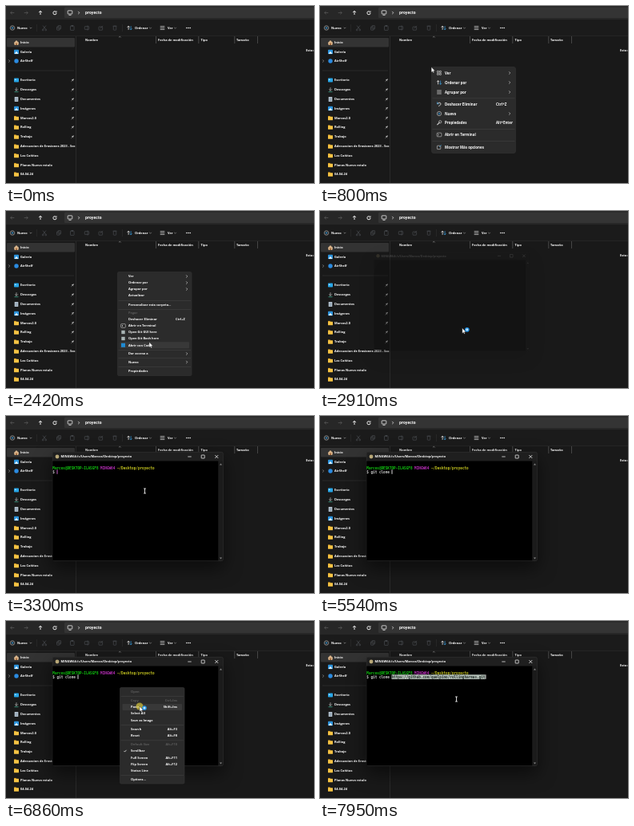
An HTML page with a canvas for the animation above (8000 ms loop, 385 by 222 pixels).

```html
<!DOCTYPE html>
<html lang="es">
<head>
<meta charset="utf-8">
<title>Explorador y terminal</title>
<style>
  html, body { margin: 0; width: 100%; height: 100%; overflow: hidden; background: #191919; }
  canvas { display: block; width: 385px; height: 222px; }
</style>
</head>
<body>
<canvas id="stage" width="385" height="222"></canvas>
<script>
const ctx = document.getElementById('stage').getContext('2d');
const LOOP = 8000;
const SANS = '"Open Sans", "Noto Sans", sans-serif';
const MONO = '"DejaVu Sans Mono", monospace';
const WHITE = '#fff', DIM = '#5c5c5c', FAINT = '#484b50', BLUE = '#3a9fe0', CELL = 2.6;

function rect(x, y, w, h, color) {
  ctx.fillStyle = color;
  ctx.fillRect(x, y, w, h);
}

function box(x, y, w, h, radius, fill, stroke) {
  ctx.beginPath();
  ctx.roundRect(x, y, w, h, radius);
  if (fill) { ctx.fillStyle = fill; ctx.fill(); }
  if (stroke) { ctx.strokeStyle = stroke; ctx.lineWidth = 0.7; ctx.stroke(); }
}

function trace(points) {
  ctx.beginPath();
  for (let i = 0; i < points.length; i += 2) ctx.lineTo(points[i], points[i + 1]);
}

function line(points, color = WHITE, width = 0.7) {
  trace(points);
  ctx.strokeStyle = color;
  ctx.lineWidth = width;
  ctx.stroke();
}

function shape(points, color) {
  trace(points);
  ctx.fillStyle = color;
  ctx.fill();
}

function circle(x, y, r, fill, stroke, width = 0.7) {
  ctx.beginPath();
  ctx.arc(x, y, r, 0, Math.PI * 2);
  if (fill) { ctx.fillStyle = fill; ctx.fill(); }
  if (stroke) { ctx.strokeStyle = stroke; ctx.lineWidth = width; ctx.stroke(); }
}

// y is the middle of the capitals; set large and scaled down for exact advances.
function text(str, x, y, { size = 3.95, color = WHITE, font = SANS, align = 'left' } = {}) {
  ctx.save();
  ctx.translate(x, y + size * 0.36);
  ctx.scale(0.1, 0.1);
  ctx.font = `700 ${size * 10}px ${font}`;
  ctx.textAlign = align;
  ctx.fillStyle = color;
  ctx.fillText(str, 0, 0);
  ctx.restore();
}

const mono = (str, col, y, color) =>
  text(str, 58.3 + col * CELL, y, { size: CELL / 0.602, font: MONO, color });

const chevronRight = (x, y, color = '#ccc') => line([x - 0.8, y - 1.6, x + 0.8, y, x - 0.8, y + 1.6], color);
const chevronDown = (x, y) => line([x - 1.3, y - 0.6, x, y + 0.7, x + 1.3, y - 0.6], '#aaa', 0.6);

const icons = {
  home(x, y) {
    shape([x - 3, y, x, y - 3, x + 3, y, x + 2.3, y + 3, x - 2.3, y + 3], '#d9b48a');
    rect(x - 0.8, y + 0.6, 1.6, 2.4, '#9a5a2c');
  },
  picture(x, y) {
    box(x - 3, y - 2.8, 6, 5.6, 0.8, '#2b93dc');
    shape([x - 2.5, y + 2.4, x, y - 0.8, x + 2.5, y + 2.4], '#e4f3ff');
  },
  cloud(x, y) { circle(x, y, 2.7, '#2b8be0'); },
  desktop(x, y) {
    box(x - 3, y - 2.5, 6, 5, 0.7, '#27a5e6');
    rect(x - 2, y - 1.2, 1.6, 1, '#d8f2ff');
  },
  download(x, y) {
    line([x, y - 2.8, x, y + 1.2], '#ccc');
    line([x - 1.8, y - 0.5, x, y + 1.3, x + 1.8, y - 0.5], '#ccc');
    line([x - 2.5, y + 2.7, x + 2.5, y + 2.7], '#3fb79a');
  },
  page(x, y) {
    box(x - 2.3, y - 2.9, 4.6, 5.8, 0.5, '#b9c6d2');
    for (const dy of [-1.2, 0.2, 1.6]) line([x - 1.4, y + dy, x + 1.4, y + dy], '#5b7488', 0.5);
  },
  folder(x, y) {
    rect(x - 3, y - 2.6, 2.8, 2, '#d99a1c');
    box(x - 3, y - 1.8, 6, 4.5, 0.5, '#f5c344');
  },
  grid(x, y) {
    for (const dx of [-2.6, 0.4]) for (const dy of [-2.6, 0.4]) box(x + dx, y + dy, 2, 2, 0.3, null, '#ccc');
  },
  sort(x, y) {
    line([x - 2.8, y - 0.8, x - 1.4, y - 2.4, x, y - 0.8]);
    line([x - 1.4, y - 2.4, x - 1.4, y + 2.4]);
    line([x + 0.2, y + 0.8, x + 1.6, y + 2.4, x + 3, y + 0.8], BLUE);
    line([x + 1.6, y + 2.4, x + 1.6, y - 2.4], BLUE);
  },
  list(x, y) {
    for (const dy of [-2, 0, 2]) line([x - 2.8, y + dy, x + 2.8, y + dy], '#ccc', 0.8);
  },
  undo(x, y) {
    line([x - 2.5, y - 2.6, x - 2.5, y - 0.2, x, y - 0.2], BLUE);
    line([x - 2.5, y - 0.4, x, y - 2, x + 2, y - 0.8, x + 1.8, y + 0.8, x - 0.8, y + 2.8]);
  },
  plus(x, y) {
    circle(x, y, 2.7, null, '#ccc', 0.6);
    line([x - 1.4, y, x + 1.4, y], BLUE);
    line([x, y - 1.4, x, y + 1.4], BLUE);
  },
  wrench(x, y) {
    line([x - 2.6, y + 2.6, x + 0.6, y - 0.6], '#ccc', 1.2);
    circle(x + 1.2, y - 1.2, 1.6, null, '#ccc');
  },
  terminal(x, y) {
    box(x - 2.8, y - 2.3, 5.6, 4.6, 0.6, '#222', '#bbb');
    line([x - 1.6, y - 1, x - 0.4, y, x - 1.6, y + 1], WHITE, 0.6);
  },
  expand(x, y) {
    box(x - 2.6, y - 1.8, 4.4, 4.4, 0.6, null, '#bbb');
    line([x, y, x + 2.7, y - 2.7], BLUE);
  },
  tool(x, y) { rect(x - 2.2, y - 2.2, 4.4, 4.4, '#a9b4b4'); },
  editor(x, y) { rect(x - 2.5, y - 2.5, 5, 5, '#1f8ad2'); }
};

function navigation() {
  rect(0, 0, 385, 17, '#272727');
  box(73, 1.5, 330, 13.5, 1.5, '#343434');
  for (const [x, d] of [[8, -1], [25, 1]]) {
    line([x - 2.3, 8.5, x + 2.3, 8.5], DIM);
    line([x + d * 0.4, 6.6, x + d * 2.3, 8.5, x + d * 0.4, 10.4], DIM);
  }
  line([43, 11, 43, 6.2], WHITE, 0.9);
  line([41.1, 8.1, 43, 6.2, 44.9, 8.1], WHITE, 0.9);
  ctx.beginPath();
  ctx.arc(61, 8.7, 2.1, 0, 5.2);
  ctx.strokeStyle = WHITE;
  ctx.stroke();
  line([63, 6, 63, 7.9, 61.3, 7.9]);
  box(77.2, 5.8, 5.6, 4.2, 0.6, null, WHITE);
  line([78.5, 11.4, 81.5, 11.4]);
  chevronRight(91, 8.5, WHITE);
  text('proyecto', 99, 8.5, { size: 4.7 });
}

function toolbar() {
  rect(0, 17, 385, 21, '#1b1b1b');
  rect(0, 37.4, 385, 0.6, '#2c2c2c');
  icons.plus(8, 27.5);
  text('Nuevo', 14, 27.5);
  chevronDown(31, 27.5);
  rect(38.5, 23, 0.5, 9, '#333');

  line([46, 24.5, 49.5, 29], FAINT);
  line([50, 24.5, 46.5, 29], FAINT);
  circle(46.2, 30, 0.9, null, FAINT);
  circle(49.8, 30, 0.9, null, FAINT);
  box(63.5, 26, 3.6, 4.2, 0.5, null, FAINT);
  box(65, 24.6, 3.6, 4.2, 0.5, null, FAINT);
  box(80.5, 25, 4.6, 5.4, 0.5, null, FAINT);
  rect(81.6, 24.2, 2.4, 1.4, FAINT);
  box(98.3, 25.6, 5.4, 3.8, 0.5, null, FAINT);
  line([102, 24.4, 102, 30.6], FAINT);
  box(116, 26, 4.6, 4.2, 0.5, null, FAINT);
  line([118, 28, 121, 24.8], FAINT);
  line([133.5, 25.2, 138.5, 25.2], FAINT);
  box(134.3, 25.2, 3.4, 5, 0.5, null, FAINT);
  rect(145.5, 23, 0.5, 9, '#333');

  icons.sort(154.5, 27.5);
  text('Ordenar', 161, 27.5);
  chevronDown(180.5, 27.5);
  icons.list(195.5, 27.5);
  text('Ver', 202, 27.5);
  chevronDown(211.5, 27.5);
  for (const x of [225.8, 228, 230.2]) circle(x, 27.5, 0.75, WHITE);
}

const places = [
  ['home', 'Inicio', 46], ['picture', 'Galería', 57.5], ['cloud', 'AirShelf', 69],
  ['desktop', 'Escritorio', 93], ['download', 'Descargas', 105], ['page', 'Documentos', 117],
  ['picture', 'Imágenes', 128.5], ['folder', 'Marcos2.0', 140.5], ['folder', 'Rolling', 152],
  ['folder', 'Trabajo', 164], ['folder', 'Adecuacion de Erosiones 2023 - Soc', 176],
  ['folder', 'Las Cañitas', 187.5], ['folder', 'Planos Nuevo rotulo', 199.5], ['folder', '04-04-24', 211]
];

function sidebar() {
  box(1, 40, 85, 11.5, 1, '#333');
  ctx.save();
  ctx.beginPath();
  ctx.rect(0, 38, 87, 184);
  ctx.clip();
  for (const [icon, label, y] of places) {
    icons[icon](13, y);
    text(label, 18, y);
    if (y > 90 && y < 170) {
      line([81.6, y + 1.7, 83, y + 0.3], '#bbb', 0.6);
      line([82.2, y - 0.8, 84.2, y + 1.1], '#bbb', 0.7);
      line([83.2, y, 84.6, y - 1.4], '#bbb', 1.3);
    }
  }
  ctx.restore();
  chevronRight(4, 69, '#999');
  rect(3, 80.7, 82, 0.6, '#363636');
  rect(87, 38, 0.6, 184, '#363636');
}

function fileList() {
  [['Nombre', 99], ['Fecha de modificación', 190], ['Tipo', 243.5], ['Tamaño', 288]]
    .forEach(([label, x]) => text(label, x, 42.5));
  for (const x of [187, 240.5, 285.5, 314]) rect(x, 38, 0.7, 9, '#5a5a5a');
  line([141, 39.3, 142.3, 38.3, 143.6, 39.3], '#aaa', 0.6);
  text('Esta carpeta está vacía.', 375, 55.5);
}

// Rows: [y, label, extra]; a missing label is a separator.
const modernMenu = {
  x: 139.5, y: 76.5, w: 105, h: 108, textX: 156, iconX: 149, keyX: 220, arrowX: 237, size: 4.45, radius: 2.5, rowH: 10,
  rows: [
    [84, 'Ver', { icon: 'grid', sub: true }], [96, 'Ordenar por', { icon: 'sort', sub: true }],
    [108, 'Agrupar por', { icon: 'list', sub: true }], [115.5],
    [123, 'Deshacer Eliminar', { icon: 'undo', key: 'Ctrl+Z' }], [135, 'Nuevo', { icon: 'plus', sub: true }],
    [146.5, 'Propiedades', { icon: 'wrench', key: 'Alt+Enter' }], [154],
    [161.5, 'Abrir en Terminal', { icon: 'terminal' }], [169],
    [177, 'Mostrar Más opciones', { icon: 'expand' }]
  ]
};
const classicMenu = {
  x: 139.5, y: 76.5, w: 92.5, h: 130, textX: 153, iconX: 146.5, keyX: 212, arrowX: 226, size: 3.95, radius: 1.5, rowH: 8,
  rows: [
    [82, 'Ver', { sub: true }], [90, 'Ordenar por', { sub: true }], [98, 'Agrupar por', { sub: true }],
    [106, 'Actualizar'], [112], [117.5, 'Personalizar esta carpeta...'], [123],
    [128, 'Pegar', { off: true }], [136, 'Deshacer Eliminar', { key: 'Ctrl+Z' }],
    [144, 'Abrir en Terminal', { icon: 'terminal' }], [152, 'Open Git GUI here', { icon: 'tool' }],
    [160, 'Open Git Bash here', { icon: 'tool' }], [168.3, 'Abrir con Code', { icon: 'editor' }], [174],
    [179, 'Dar acceso a', { sub: true }], [184.3], [189.5, 'Nuevo', { sub: true }], [195], [200.5, 'Propiedades']
  ]
};
const terminalMenu = {
  x: 142.5, y: 83.5, w: 80.5, h: 120.5, textX: 156, keyX: 214, keyAlign: 'right', size: 3.95, radius: 1.5, rowH: 8,
  rows: [
    [88.5, 'Open', { off: true }], [94], [99.7, 'Copy', { off: true, key: 'Ctrl+Ins' }],
    [108, 'Paste', { key: 'Shift+Ins' }], [116, 'Select All'], [124.3, 'Save as Image'], [130],
    [135.5, 'Search', { key: 'Alt+F3' }], [143.7, 'Reset', { key: 'Alt+F8' }], [149.5],
    [155, 'Default Size', { off: true, key: 'Alt+F10' }], [163, 'Scrollbar', { check: true }],
    [171.3, 'Full Screen', { key: 'Alt+F11' }], [179.5, 'Flip Screen', { key: 'Alt+F12' }],
    [187.7, 'Status Line'], [193.3], [199, 'Options...']
  ]
};

function drawMenu(m, pointer) {
  box(m.x, m.y, m.w, m.h, m.radius, '#2b2b2b', '#323232');
  for (const [y, label, extra = {}] of m.rows) {
    if (!label) { rect(m.x + 1, y, m.w - 2, 0.6, '#414141'); continue; }
    const inside = pointer.x > m.x && pointer.x < m.x + m.w && Math.abs(pointer.y - y) < m.rowH / 2;
    if (inside) box(m.x + 3, y - m.rowH / 2, m.w - 6, m.rowH, 1, '#383838');
    const style = { size: m.size, color: extra.off ? DIM : WHITE };
    text(label, m.textX, y, style);
    if (extra.icon) icons[extra.icon](m.iconX, y);
    if (extra.sub) chevronRight(m.arrowX, y);
    if (extra.key) text(extra.key, m.keyX, y, { ...style, align: m.keyAlign });
    if (extra.check) line([147.5, y, 148.5, y + 1.1, 150.5, y - 1.2]);
  }
}

const command = 'git clone ';
const keyTimes = [4040, 4140, 4230, 4330, 4470, 4600, 4740, 4900, 5040, 5540];
const pasteTime = 6910;
const url = 'https://github.com/quelpino/rollingharmas.git';
const caretHidden = [[0, 3270], [3770, 4040], [6040, 6580], [7410, 7950]];
const during = (t, spans) => spans.some(([from, to]) => t >= from && t < to);

function windowFrame() {
  ctx.save();
  ctx.shadowColor = 'rgba(0, 0, 0, 0.55)';
  ctx.shadowBlur = 22;
  ctx.shadowOffsetY = 9;
  box(58, 45, 213.5, 137, 2, '#1f1f1f');
  ctx.restore();
  box(58.3, 45.3, 213, 136.4, 2, null, '#303030');
  rect(58.3, 56.5, 207.2, 124.8, '#000');
  circle(64, 51, 2.4, '#b9a878');
  text('MINGW64:/c/Users/Marcos/Desktop/proyecto', 68.5, 51, { size: 3.9 });
  line([227.3, 51, 231.7, 51]);
  box(244.2, 49, 4, 4, 0.3, null, WHITE);
  line([261.3, 49, 265.3, 53]);
  line([265.3, 49, 261.3, 53]);
  rect(265.5, 56.5, 5.5, 124.5, '#1b1b1b');
  shape([267, 61.5, 268.5, 59.5, 270, 61.5], '#888');
  shape([267, 177.5, 268.5, 179.5, 270, 177.5], '#888');
}

function terminalWindow(t) {
  const k = Math.min(1, (t - 2900) / 200);
  const ease = 1 - (1 - k) ** 3;
  const scale = 0.9 + 0.1 * ease;
  ctx.save();
  ctx.globalAlpha = ease;
  ctx.translate(164.5, 113.5);
  ctx.scale(scale, scale);
  ctx.translate(-164.5, -113.5);
  windowFrame();

  if (t >= 3270) {
    mono('Marcos@DESKTOP-ILASGF8', 0, 65, '#10c810');
    mono('MINGW64', 23, 65, '#c030c0');
    mono('~/Desktop/proyecto', 31, 65, '#c8c820');
    const typed = keyTimes.filter(time => t >= time).length;
    mono('$ ' + command.slice(0, typed), 0, 70.2, '#d0d0d0');
    let col = 2 + typed;
    if (t >= pasteTime) {
      rect(58.3 + col * CELL, 67.3, url.length * CELL, 5.7, '#b4c0b8');
      mono(url, col, 70.2, '#202a26');
      col += url.length;
    }
    if (!during(t, caretHidden)) rect(58.3 + col * CELL, 67.3, 1, 5.5, typed ? '#d8d8d8' : '#c860c8');
  }
  ctx.restore();
}

// Pointer stops: [time, x, y], eased in between.
const pointerPath = [
  [30, 356, 228], [600, 139, 76], [760, 139, 76], [1640, 168, 174], [1850, 168, 174],
  [2400, 179, 164.5], [2540, 179, 164.5], [2580, 179, 161], [2760, 179, 161], [3270, 173.5, 94],
  [5660, 173.5, 94], [6050, 142, 83], [6200, 142, 83], [6700, 167, 107], [6930, 167, 107], [7270, 170.5, 98]
];
const clicks = [620, 1720, 2640, 6070, 6800];

function pointerAt(t) {
  let previous = pointerPath[0];
  for (const stop of pointerPath) {
    if (t < stop[0]) {
      const k = Math.max(0, (t - previous[0]) / (stop[0] - previous[0]));
      const e = k * k * (3 - 2 * k);
      return { x: previous[1] + (stop[1] - previous[1]) * e, y: previous[2] + (stop[2] - previous[2]) * e };
    }
    previous = stop;
  }
  return { x: previous[1], y: previous[2] };
}

function drawPointer(t, { x, y }, overTerminal) {
  if (t >= 4040 && t < 5680) return;
  if (clicks.some(time => t >= time && t < time + 110)) circle(x, y, 4.5, 'rgba(240, 220, 60, 0.6)');
  if (overTerminal) {
    line([x, y - 3, x, y + 3], '#f0f0f0', 0.9);
    line([x - 1.5, y - 3, x + 1.5, y - 3], '#f0f0f0', 0.8);
    line([x - 1.5, y + 3, x + 1.5, y + 3], '#f0f0f0', 0.8);
    return;
  }
  const arrow = [0, 0, 0, 6.6, 1.5, 5.3, 2.5, 7.5, 3.5, 7, 2.6, 4.9, 4.6, 4.8]
    .map((v, i) => v + (i % 2 ? y : x));
  shape(arrow, '#fff');
  line([...arrow, x, y], '#222', 0.4);
  if (during(t, [[2760, 3100], [6830, 6930]])) circle(x + 6, y + 2, 2.2, '#bfe4ff', '#1f8fe0', 1.3);
}

function draw(t) {
  rect(0, 0, 385, 222, '#191919');
  navigation();
  toolbar();
  sidebar();
  fileList();
  const pointer = pointerAt(t);
  if (t >= 2900) terminalWindow(t);
  if (t >= 700 && t < 1800) drawMenu(modernMenu, pointer);
  if (t >= 1830 && t < 2740) drawMenu(classicMenu, pointer);
  const menuOpen = t >= 6150 && t < pasteTime;
  if (menuOpen) drawMenu(terminalMenu, pointer);
  drawPointer(t, pointer, t >= 3100 && !menuOpen);
}

const start = performance.now();
function frame() {
  draw((performance.now() - start) % LOOP);
  requestAnimationFrame(frame);
}
frame();
</script>
</body>
</html>
```
